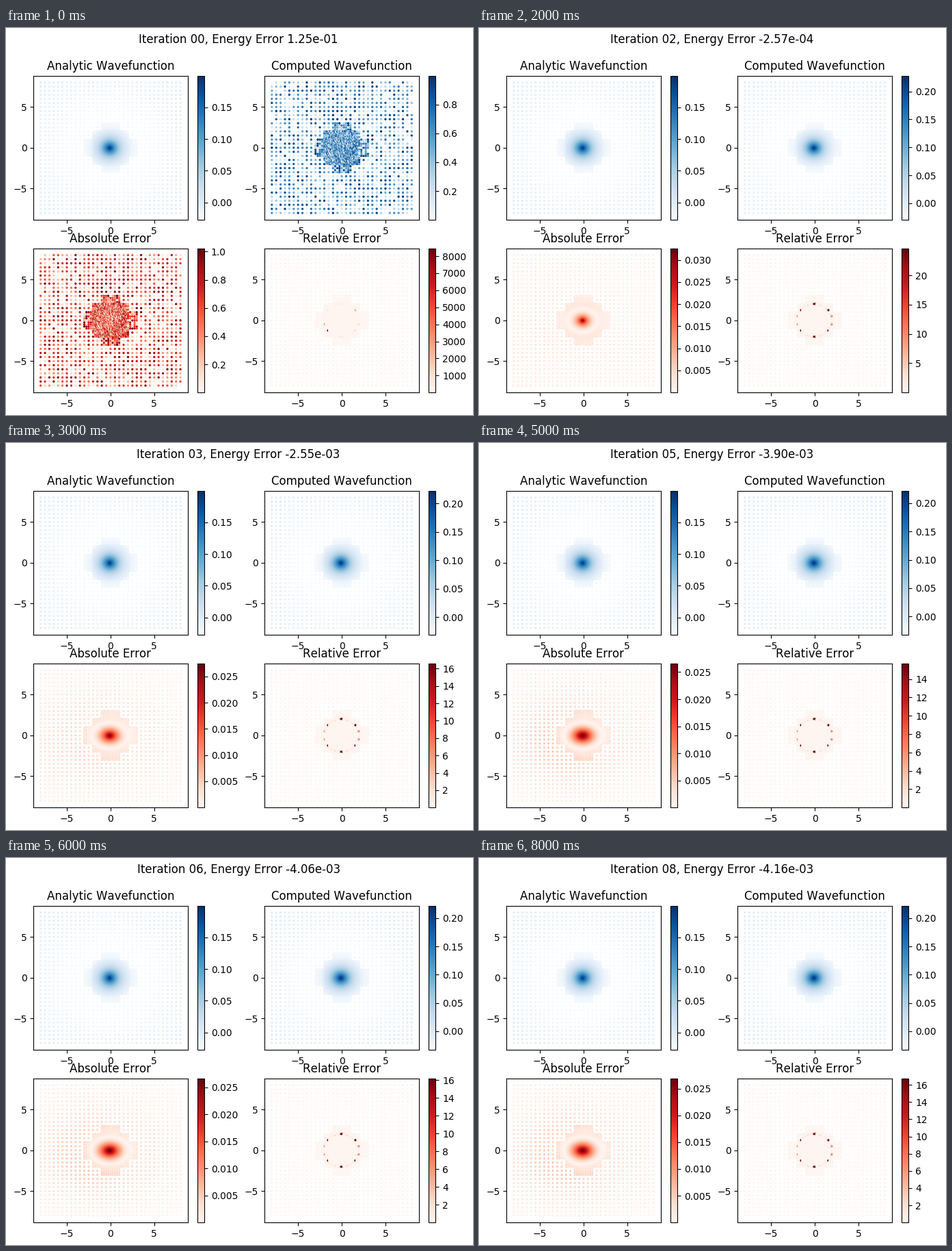
A matplotlib script that plays this animation: 683x565 px, repeating every 9000 ms.

```python
import numpy as np
import matplotlib.pyplot as plt
from matplotlib.animation import FuncAnimation
from matplotlib.ticker import MaxNLocator

W, H, DPI = 683, 565, 100
plt.rcParams["font.family"] = "DejaVu Sans"
plt.rcParams["text.kerning_factor"] = 6

# One entry per iteration
ENERGY = [1.25e-1, -9.38e-3, -2.57e-4, -2.55e-3, -3.50e-3,
          -3.90e-3, -4.06e-3, -4.13e-3, -4.16e-3]
COMP_LO = [0.002, -.0300, -.0294, -.0305, -.0313, -.0322, -.0327, -.0328, -.0328]
COMP_HI = [0.998, .2570, .2280, .2225, .2217, .2218, .2218, .2219, .2219]
ABS_HI = [1.022, .0573, .0326, .0275, .0268, .0266, .02665, .0268, .0269]
REL_HI = [8450, 62.2, 24.6, 16.6, 15.06, 15.7, 16.2, 16.55, 16.75]
MIX = [0, 0, .35, .75, 1, 1, 1, 1, 1]

# Adaptive mesh in units of 1/16
N = 16


def refined(i, j, cell, radius):
    """Points touching a cell whose centre lies within radius."""
    cx, cy = [(np.maximum(np.ceil(np.abs(v) / cell) - 1, 0) + .5) * cell
              for v in (i, j)]
    return np.hypot(cx, cy) < radius * N


def every(i, j, di, dj):
    return (i % di == 0) & (j % dj == 0)


side = np.arange(-8 * N, 8 * N + 1)
I, J = np.meshgrid(side, side, indexing="ij")
keep = (every(I, J, 8, 8)
        | (every(I, J, 4, 4) & refined(I, J, N, 2.7))
        | (every(I, J, 1, 2) & refined(I, J, N // 2, 2.2)))
I, J = I[keep], J[keep]
x, y = I / N, J / N
r = np.hypot(x, y)
exact = (2 - r) * np.exp(-r / 2) / (4 * np.sqrt(2 * np.pi))
noise = np.random.default_rng(7).uniform(0, 1, x.size)

# Relative error peaks beside the node at r = 2
near = np.abs(I**2 + J**2 - 4 * N**2) == 1
node = np.abs(exact[near]).max()
pole = np.where(np.abs(exact) > 1e-9, node / np.maximum(np.abs(exact), 1e-9), 0)
spots = pole * np.minimum(1, 1.6 * np.abs(y) / np.maximum(r, 1e-9))
first = noise * np.where((x < 0) & (y < 0), 1, .45)
first[near & (I == -25) & (J == -20)] = 1

order = np.argsort(x + near * np.where((x > 1) & (y > 0), .2, .07), kind="stable")


def error(k):
    sharp = (np.exp(-2.4 * r) - .09 * np.exp(-((r - 1.9) / .9)**2)
             - .03 * (r / 8)**2 * (1 - .04 * x - .04 * y))
    s = np.sqrt((x / 1.1)**2 + (y / .85)**2 + .06)
    broad = (2 - s) * np.exp(-s / 2) / 1.55
    tilt = .85 * (1 - .35 * np.tanh(x / 4)) * (1 - .15 * np.tanh(y / 4))
    broad = np.where(broad < 0, broad * tilt, broad)
    return ABS_HI[k] * ((1 - MIX[k]) * sharp + MIX[k] * broad)


def fields(k):
    if k == 0:
        return noise, np.abs(noise - exact), REL_HI[0] * spots * first
    e = error(k)
    return exact + e, np.abs(e), REL_HI[k] * spots


fig = plt.figure(figsize=(W / DPI, H / DPI), dpi=DPI, facecolor="white")


def box(left, top, w, h):
    return fig.add_axes([left / W, 1 - (top + h) / H, w / W, h / H])


def panel(col, row, title, cmap, px, py):
    left, top = 40.15 + 338.18 * col, 69.8 + 252 * row
    ax = box(left, top, 225.45, 210)
    dots = ax.scatter(px, py, s=2, c=np.zeros(px.size), cmap=cmap)
    ax.set(xlim=(-8.82, 8.82), ylim=(-8.82, 8.82),
           xticks=[-5, 0, 5], yticks=[-5, 0, 5])
    ax.set_title(title, fontsize=12)
    dots.set_clim(0, 1)
    fig.colorbar(dots, cax=box(left + 239.55, top, 10.5, 210),
                 ticks=MaxNLocator(9, steps=[1, 2, 2.5, 5, 10]))
    return dots


def show(dots, values, lo, hi):
    dots.set_array(values)
    dots.set_clim(lo, hi)


analytic = panel(0, 0, "Analytic Wavefunction", "Blues", x, y)
computed = panel(1, 0, "Computed Wavefunction", "Blues", x, y)
absolute = panel(0, 1, "Absolute Error", "Reds", x, y)
relative = panel(1, 1, "Relative Error", "Reds", x[order], y[order])
show(analytic, exact, exact.min(), exact.max())
heading = fig.text(340.15 / W, 1 - 8.5 / H, "", fontsize=12, ha="center", va="top")


def update(k):
    comp, err, rel = fields(k)
    show(computed, comp, COMP_LO[k], COMP_HI[k])
    show(absolute, err, .002 * ABS_HI[k], ABS_HI[k])
    show(relative, rel[order], .002 * REL_HI[k], REL_HI[k])
    heading.set_text(f"Iteration {k:02d}, Energy Error {ENERGY[k]:.2e}")
    return computed, absolute, relative, heading


anim = FuncAnimation(fig, update, frames=len(ENERGY), interval=1000,
                     repeat=True, repeat_delay=0, blit=False)
plt.show()
```
